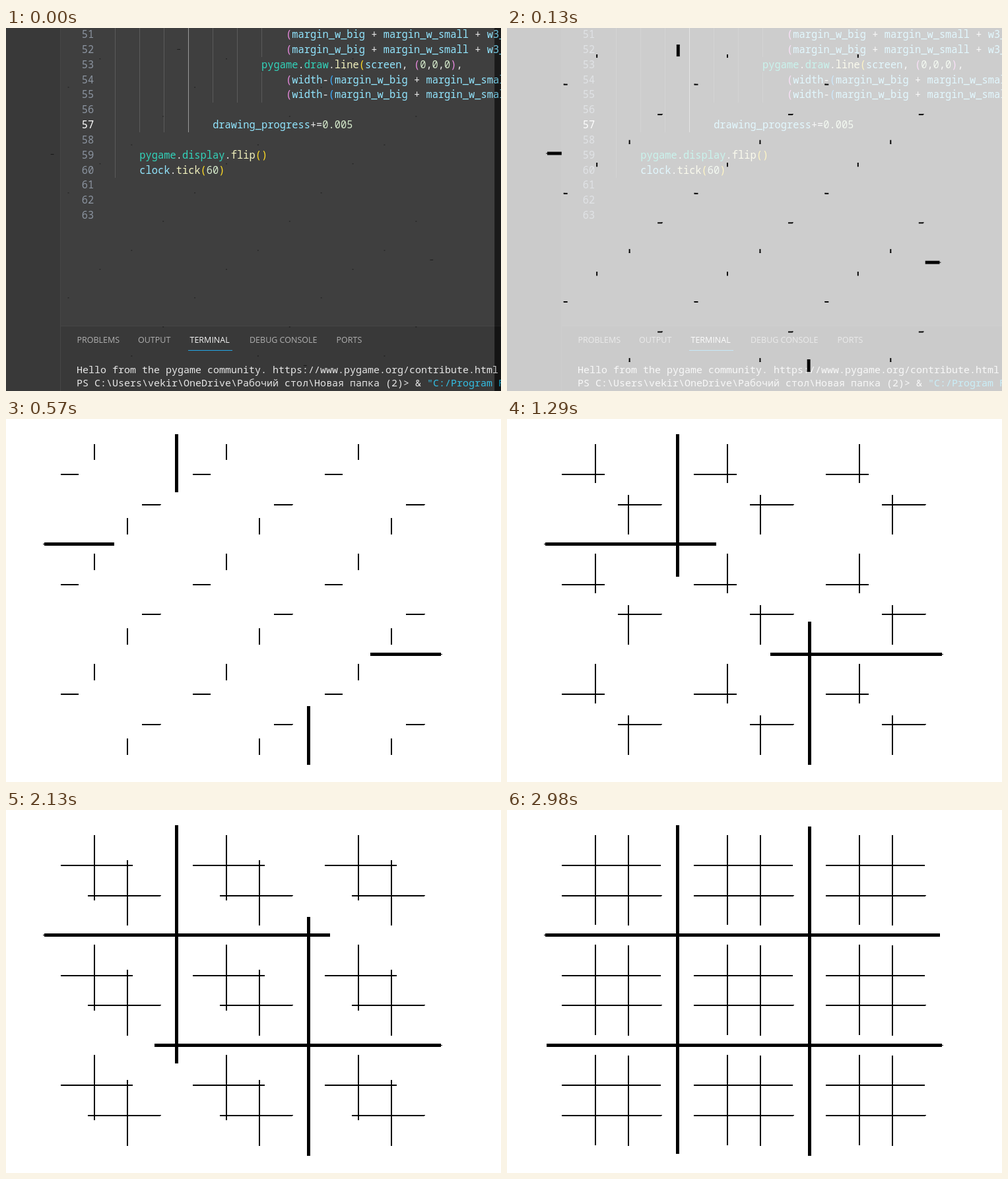
These frames come from a looping animation (750 by 550 pixels, 3580 ms). An HTML page with a canvas:

```html
<!DOCTYPE html>
<html lang="en">
<head>
<meta charset="utf-8">
<title>Drawing a nested grid</title>
<style>
html, body { margin: 0; width: 100%; height: 100%; overflow: hidden; background: #1f1f1f; }
#stage { position: absolute; left: 0; top: 0; width: 750px; height: 550px; overflow: hidden; color: #e4e4e4; }
#stage div, canvas { position: absolute; white-space: pre; }
canvas { left: 0; top: 0; }
.side { left: 0; top: 0; width: 82px; height: 550px; background: #181818; border-right: 1px solid #272727; }
.panel { left: 83px; top: 451px; width: 667px; height: 99px; background: #181818; border-top: 1px solid #272727; }
.under { left: 276px; top: 488px; width: 67px; height: 1px; background: #0098e0; }
.guide { width: 1px; background: #404040; }
.code { font: 15.4px/22.83px "Noto Sans Mono", monospace; }
.term { font: 15px/20px "Noto Sans Mono", monospace; }
.tab { font: 12.5px/20px "Open Sans", sans-serif; color: #a4a4a4; }
</style>
</head>
<body>
<div id="stage">
  <div class="side"></div>
  <div class="panel"></div>
  <div class="under"></div>
</div>
<script>
const stage = document.getElementById('stage');
const ROW = 22.83, COL = 9.24, LEFT = 165.3;

function put(cls, x, y, html = '', style = '') {
  stage.insertAdjacentHTML('beforeend',
    `<div class="${cls}" style="left:${x}px;top:${y}px;${style}">${html}</div>`);
}

function highlight(line) {
  const brackets = ['#ffd700', '#e878dc', '#179fff'];
  let depth = line[0] === '(' ? 1 : 0;
  return line.replace(/[a-z_]\w*|\d[\d.]*|[()]/g, word => {
    let color = '#80e2ff';
    if (word === '(') color = brackets[depth++];
    else if (word === ')') color = brackets[--depth];
    else if (/^\d/.test(word)) color = '#d0e8c4';
    else if (/^(pygame|draw|display)$/.test(word)) color = '#10cdb0';
    else if (/^(line|flip|tick)$/.test(word)) color = '#f0f0b4';
    return `<span style="color:${color}">${word}</span>`;
  });
}

// Editor: indent guides as [column, first row, end row, colour]
[[0, 0, 10], [4, 0, 7], [8, 0, 7], [12, 0, 7, '#8a8a8a'], [16, 0, 5], [20, 0, 5], [24, 0, 2], [24, 3, 5]]
  .forEach(([col, from, to, color = '#404040']) =>
    put('guide', Math.floor(LEFT + col * COL), from * ROW - 1.4, '',
      `height:${(to - from) * ROW}px;background:${color}`));

const margins = 'margin_w_big + margin_w_small + w3_';
const code = [
  [28, '(' + margins], [28, '(' + margins],
  [24, 'pygame.draw.line(screen, (0,0,0),'],
  [28, '(width-(' + margins], [28, '(width-(' + margins],
  [0, ''], [16, 'drawing_progress+=0.005'], [0, ''],
  [4, 'pygame.display.flip()'], [4, 'clock.tick(60)'],
  [0, ''], [0, ''], [0, '']
];
code.forEach(([col, line], i) => {
  const y = i * ROW - 0.9;
  put('code', 114.8, y, 51 + i, `color:${i === 6 ? '#fff' : '#788290'}`);
  put('code', LEFT + col * COL, y, highlight(line));
});

// Terminal panel
[[107.5, 'PROBLEMS'], [200, 'OUTPUT'], [278.5, 'TERMINAL'], [369, 'DEBUG CONSOLE'], [500.5, 'PORTS']]
  .forEach(([x, name]) => put('tab', x, 462.5, name, name === 'TERMINAL' ? 'color:#f4f4f4' : ''));
put('term', 107, 507, 'Hello from the pygame community. https://www.pygame.org/contribute.html');
put('term', 107, 527, 'PS C:\\Users\\vekir\\OneDrive\\Рабочий стол\\Новая папка (2)&gt; &amp; ' +
  '<span style="color:#11b4e0">"C:/Program Files</span>');

// Window that opens over the editor
const canvas = document.createElement('canvas');
canvas.width = 750;
canvas.height = 550;
stage.append(canvas);
const ctx = canvas.getContext('2d');
const X0 = 58, Y0 = 23, W = 600, H = 500, LOOP = 3580;

// [time, picture changes until the next key, drawing ticks done]
const keys = [
  [0, 1, 0], [50, 2, 2], [130, 2, 7], [250, 6, 15], [570, 1, 35], [600, 14, 37],
  [1100, 1, 73], [1130, 4, 75], [1290, 1, 86], [1340, 9, 90], [1630, 1, 110],
  [1660, 13, 112], [2130, 1, 144], [2170, 1, 147], [2200, 10, 149],
  [2690, 1, 182], [2740, 5, 185], [2980, 1, 199], [LOOP, 1, 199]
];

function sample(t) {
  const i = keys.findIndex(key => key[0] > t) - 1;
  const [start, steps, n] = keys[i], [end, , next] = keys[i + 1];
  const part = Math.floor((t - start) / (end - start) * steps + 1e-6) / steps;
  return { time: start + part * (end - start), ticks: Math.round(n + part * (next - n)) };
}

// Inclusive pixel line; the one-pixel-high start dash stays on screen
function line(x, y, dx, dy, width) {
  const back = width > 2 ? width >> 1 : 0;
  const [xa, ya, xb, yb] = [x, y, x + dx, y + dy].map(Math.floor);
  ctx.fillRect(X0 + xa - back, Y0 + ya, width, 1);
  if (dx) ctx.fillRect(X0 + Math.min(xa, xb), Y0 + ya - back, Math.abs(xb - xa) + 1, width);
  if (dy) ctx.fillRect(X0 + xa - back, Y0 + Math.min(ya, yb), width, Math.abs(yb - ya) + 1);
}

function grid(x, y, w, h, p, width) {
  line(x + w / 3, y, 0, h * p, width);
  line(x + w * 2 / 3, y + h, 0, -h * p, width);
  line(x, y + h / 3, w * p, 0, width);
  line(x + w, y + h * 2 / 3, -w * p, 0, width);
}

function draw(now) {
  const { time, ticks } = sample(now % LOOP);
  let p = 0;
  for (let i = 0; i < ticks; i++) p += 0.005;

  const hidden = Math.max(0, 0.951 - 0.00266 * time) ** 3;
  const scale = 1 - 0.049 * hidden;
  canvas.style.opacity = 1 - hidden;
  ctx.setTransform(1, 0, 0, 1, 0, 0);
  ctx.fillStyle = '#000';
  ctx.fillRect(0, 0, 750, 550);
  ctx.setTransform(scale, 0, 0, scale, 334 * (1 - scale), 235 * (1 - scale));
  ctx.fillStyle = '#fff';
  ctx.fillRect(-90, -90, 848, 700);

  ctx.fillStyle = '#000';
  grid(0, 0, W, H, p, 5);
  for (let i = 0; i < 9; i++)
    grid(i % 3 * W / 3 + 25, Math.floor(i / 3) * H / 3 + 15, W / 3 - 50, H / 3 - 30, p, 2);
}

const begin = performance.now();
function frame() {
  draw(performance.now() - begin);
  requestAnimationFrame(frame);
}
frame();
</script>
</body>
</html>
```
